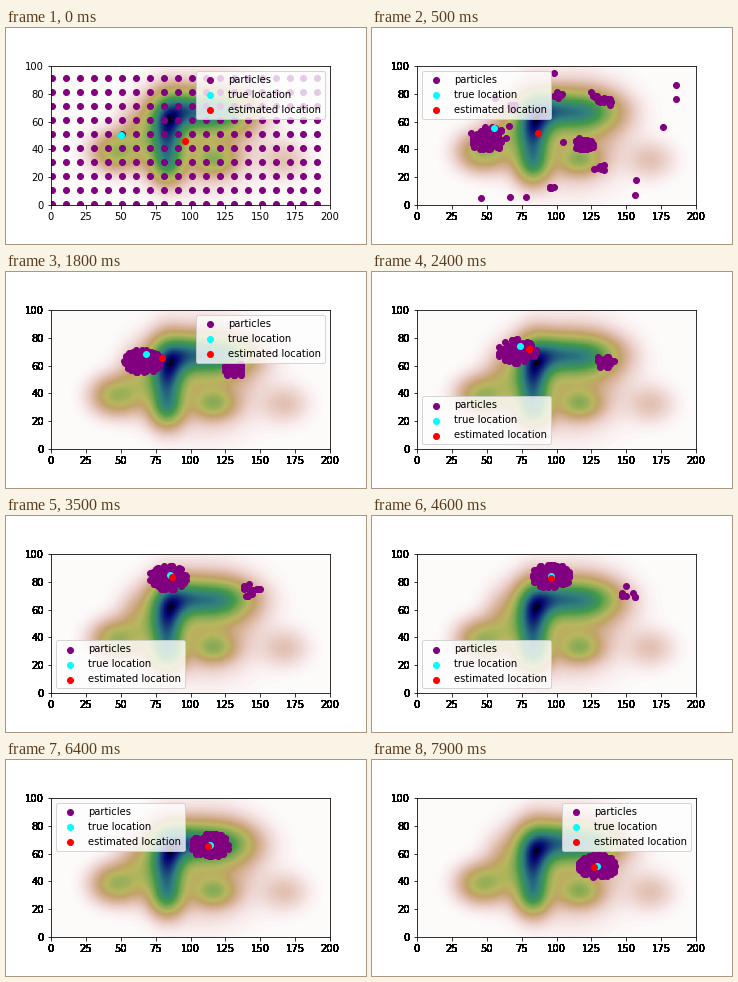
Recreate the animation shown at these times as a matplotlib script. Size 360 by 216 pixels, loop 8 s.

```python
import numpy as np
import matplotlib.pyplot as plt
from matplotlib.animation import FuncAnimation

FRAMES, STEP_MS, COUNT = 80, 100, 200
TURN = 40      # step at which the walker starts heading down
MERGE = 46     # step at which the swarm has caught up with the walker
BOLD = 14      # label copies stacked after the first step

# Density landscape: weight, centre x, centre y, spread x, spread y
HILLS = [
    (0.70, 83, 52, 8.5, 16), (0.36, 83, 28, 8, 9),
    (0.46, 94, 68, 13, 9.5), (0.50, 122, 67, 16, 9.5),
    (0.20, 112, 52, 22, 22), (0.28, 117, 32, 10, 7),
    (0.34, 46, 38, 11, 9), (0.20, 64, 50, 10, 14), (0.09, 168, 32, 11, 9),
]

# Short-lived groups, as offsets from the walker
STRAYS = [(13, 16), (46, 25), (72, 24), (77, 20), (83, 20), (78, -28), (40, -42)]
STRAY_SIZE, STRAY_END = 6, 14

rng = np.random.default_rng(7)
noise = rng.normal(size=(FRAMES, COUNT, 2))
noise /= np.maximum(1, np.linalg.norm(noise, axis=2, keepdims=True) / 2.2)
phase = rng.integers(0, 6, COUNT)
leave = 1 + rng.exponential(1.4, COUNT).clip(0, 8)
grid = np.stack(np.meshgrid(np.arange(1, 200, 10),
                            np.arange(1, 100, 10)), -1).reshape(-1, 2)
grid = rng.permutation(grid)


def walker(i):
    return np.array([50 + i, 50 + TURN - abs(i - TURN)])


def guess(i):
    return walker(i) + (48 * np.exp(-i / 14) - 2, -4 * np.exp(-i / 40))


def swarm(i):
    if i == 0:
        return grid
    here = walker(i)
    z = noise[(i + phase) // 6, np.arange(COUNT)]
    lag = max(0, 1 - i / MERGE)
    pts = here - np.array([5, 8]) * lag + z * (6, 3.8)

    first = len(STRAYS) * STRAY_SIZE
    if i < STRAY_END:
        pts[:first] = here + np.repeat(STRAYS, STRAY_SIZE, axis=0) + z[:first] * 1.5

    # A rival group thins out and finally disappears
    size = int(45 * np.exp(-max(0, i - 11) / 20)) if i < 53 else 0
    rival = slice(first, first + size)
    pts[rival] = here + (66 - i / 5, -11) + np.clip(z[rival], -1.4, 1.4) * (4, 2.6)

    early = leave > i
    pts[early] = grid[early] + i + z[early] * 0.8
    return np.round(pts)


fig = plt.figure(figsize=(5, 3), dpi=72, facecolor="white")
fig.subplots_adjust(left=0.125, right=0.9, bottom=0.125, top=0.88)
ax = fig.add_subplot()

gx, gy = np.meshgrid(np.linspace(0, 200, 200), np.linspace(0, 100, 100))
field = sum(w * np.exp(-((gx - x) / sx) ** 2 / 2 - ((gy - y) / sy) ** 2 / 2)
            for w, x, y, sx, sy in HILLS)
ax.imshow(field, cmap="gist_earth_r", origin="lower",
          extent=(0, 200, 0, 100), vmin=0)
particles = ax.scatter([], [], c="purple", label="particles")
truth = ax.scatter([], [], c="cyan", label="true location")
estimate = ax.scatter([], [], c="red", label="estimated location")
xticks, yticks = range(0, 201, 25), range(0, 101, 20)
ax.set(xlim=(0, 200), ylim=(0, 100), xticks=xticks, yticks=yticks)
ax.legend(loc="best")


def label(value, xy, shift, ha, va):
    return ax.annotate(str(value), xy, xytext=shift, textcoords="offset points",
                       ha=ha, va=va, annotation_clip=False)


# Stacked copies thicken the tick labels
copies = []
for _ in range(BOLD):
    copies += [label(v, (v, 0), (0, -7), "center", "top") for v in xticks]
    copies += [label(v, (0, v), (-7, 0), "right", "center_baseline") for v in yticks]


def draw(i):
    particles.set_offsets(swarm(i))
    truth.set_offsets([walker(i)])
    estimate.set_offsets([guess(i)])
    for text in copies:
        text.set_visible(i > 0)
    return particles, truth, estimate


anim = FuncAnimation(fig, draw, frames=FRAMES, interval=STEP_MS,
                     repeat=True, repeat_delay=0, blit=False)
plt.show()
```
